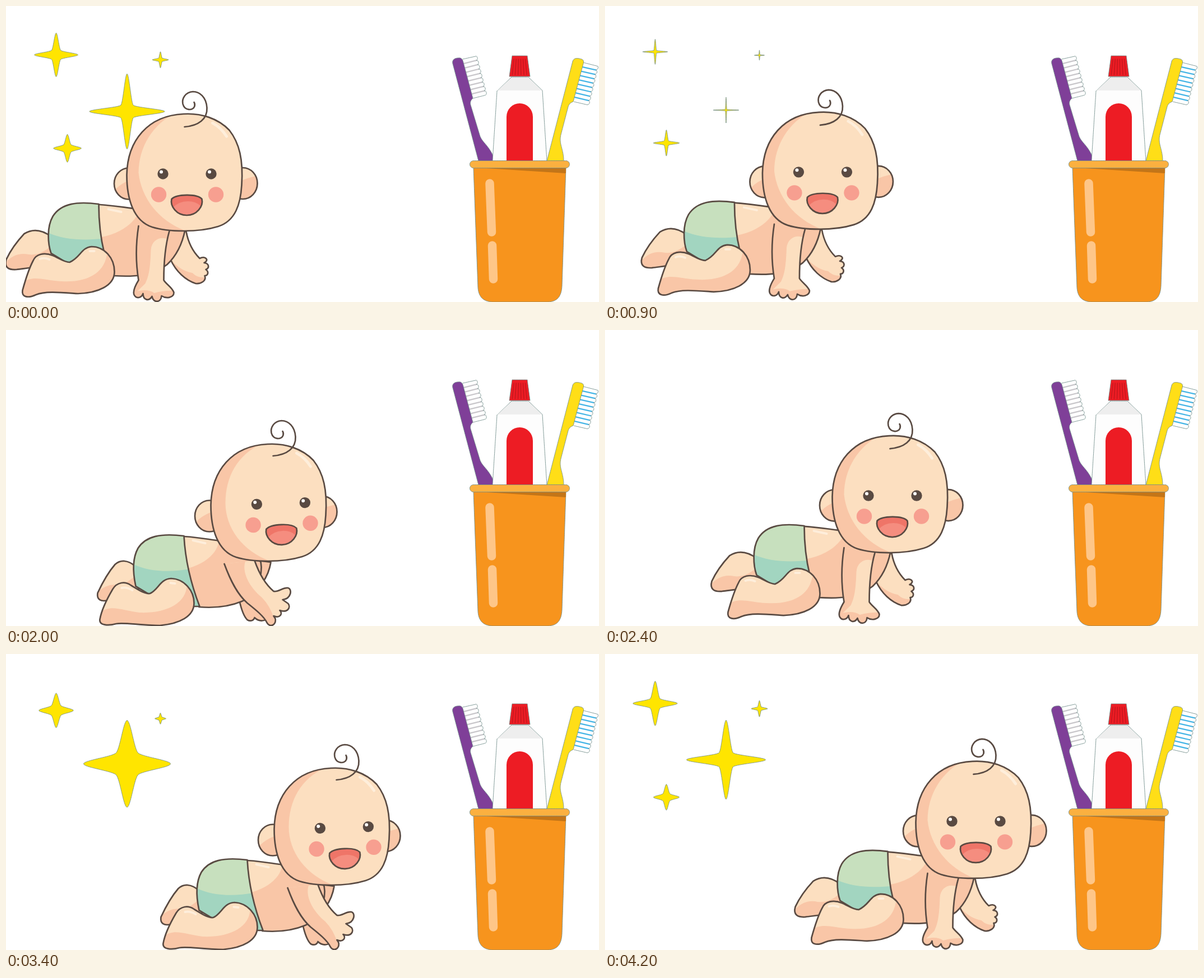
Animation of 1058x529 px, one loop 4.3 s. Source, as an HTML page with a canvas:

```html
<!DOCTYPE html>
<html lang="en">
<head>
<meta charset="utf-8">
<title>Crawling baby</title>
<style>
html, body { margin: 0; width: 100%; height: 100%; overflow: hidden; background: #fff; }
canvas { display: block; }
</style>
</head>
<body>
<canvas id="stage" width="1058" height="529"></canvas>
<script>
const ctx = document.getElementById('stage').getContext('2d');
const STEP = 100, STEPS = 43;
const INK = '#594a42', SKIN = '#fcdfc0', SHADE = '#f9c6a7', GLOSS = '#feeedb';
const MINT = '#c7e0be', TEAL = '#a2d5c0', EDGE = '#6f8c88';

function fill(d, color) {
  ctx.fillStyle = color;
  ctx.fill(new Path2D(d));
}

function line(d, color = INK, width = 2.7) {
  ctx.strokeStyle = color;
  ctx.lineWidth = width;
  ctx.stroke(new Path2D(d));
}

function dashed(path) {
  ctx.save();
  ctx.setLineDash([2, 1]);
  ctx.strokeStyle = EDGE;
  ctx.lineWidth = 0.9;
  ctx.stroke(path);
  ctx.restore();
}

function edged(d, color) {
  fill(d, color);
  dashed(new Path2D(d));
}

// Outlined shape with patches of colour clipped to it.
function part(d, base, ...patches) {
  ctx.save();
  ctx.clip(new Path2D(d));
  fill(d, base);
  for (const [shape, color] of patches) fill(shape, color);
  ctx.restore();
  line(d);
}

function dot(x, y, r, color) {
  ctx.fillStyle = color;
  ctx.beginPath();
  ctx.arc(x, y, r, 0, 7);
  ctx.fill();
}

// Each sparkle swells while rising, then thins out and vanishes.
const sparkles = [
  { x: 89.5, top: 81, rise: 32, peak: 40, birth: 29, life: 31 },
  { x: 275.5, top: 86.5, rise: 42, peak: 14.5, birth: 30, life: 31 },
  { x: 216, top: 186, rise: 26, peak: 80, birth: 25, life: 31 },
  { x: 109.5, top: 242.5, rise: 24, peak: 27.5, birth: 37, life: 26 }
];

function sparkle({ x, top, rise, peak, birth, life }, t) {
  const u = ((t - birth + STEPS) % STEPS) / life;
  if (u <= 0 || u >= 1) return;
  const size = peak * Math.sin(Math.PI * u ** 0.7);
  const waist = size * 0.3 * (1 - u ** 1.5);
  const bend = waist * 0.36, tip = waist * 0.32;
  const path = new Path2D();
  ctx.save();
  ctx.translate(x, top + rise * (1 - u) ** 2.7);
  path.moveTo(0, -size);
  for (let q = 0; q < 4; q++) {
    const c = [1, 0, -1, 0][q], s = [0, 1, 0, -1][q];
    const at = (a, b) => [a * c - b * s, a * s + b * c];
    path.bezierCurveTo(...at(tip, -size), ...at(waist - bend, -waist - bend), ...at(waist, -waist));
    path.bezierCurveTo(...at(waist + bend, bend - waist), ...at(size, -tip), ...at(size, 0));
  }
  ctx.fillStyle = '#ffe500';
  ctx.fill(path);
  dashed(path);
  ctx.restore();
}

// Tufts along a root line from (x, y) by (dx, dy), each of length (lx, ly).
function bristles(x, y, dx, dy, lx, ly, color) {
  const n = 9, path = new Path2D();
  const at = (k, l) => [x + dx * k / n + lx * l, y + dy * k / n + ly * l];
  path.moveTo(x, y);
  for (let i = 0; i < n; i++) {
    path.lineTo(...at(i + 0.08, 1));
    path.quadraticCurveTo(...at(i + 0.5, 1.09), ...at(i + 0.85, 1));
    path.lineTo(...at(i + 1, 0.93));
  }
  path.lineTo(...at(n, 0));
  ctx.fillStyle = '#fff';
  ctx.fill(path);
  for (let i = 1; i < n; i++) line(`M${at(i, 0)}L${at(i, 0.93)}`, color, 2.3);
  dashed(path);
}

function toiletries() {
  bristles(815, 95, 18, 70, 24, -6, '#c9c7cb');
  edged('M797 103C795 94 804 92 811 93Q815 95 816 101L833 165Q827 170 829 177L845 230C849 245 862 247 873 277H843Z', '#7f3f98');
  bristles(1030, 101, -17, 70, 26, 6, '#45b5e6');
  edged('M1011 99C1013 92 1020 93 1027 95Q1032 97 1030 103L1012 171Q1005 173 1003 180L990 230C986 247 995 255 995 277H965Z', '#ffde17');

  edged('M902 127H932L957 151L965 277H868L876 152Z', '#fdfdfd');
  fill('M902 128H932L956 151H877Z', '#eeeeee');
  fill('M893 277V198A23.5 24 0 0 1 940 198V277Z', '#ed1c24');
  edged('M903 89H930L935 126H898Z', '#ed1c24');
  for (let i = 1; i < 7; i++) line(`M${902 + i * 4.1} 95L${898 + i * 5.2} 123`, '#c4171e', 1.5);

  edged('M834 288H999L992 500C991 520 983 529 965 529H870C852 529 843 520 842 503Z', '#f7941d');
  fill('M842 289H999V299Z', '#c37518');
  edged('M834 276.5H999A6.5 6.5 0 0 1 999 289.5H834A6.5 6.5 0 0 1 834 276.5Z', '#fbb040');
  line('M863 317L866.5 404M867.5 428L869.5 488', '#fec688', 15.5);
}

function ear(x, y) {
  part(`M${x - 26} ${y}a26 28 0 1 1 52 0a26 28 0 1 1 -52 0Z`, SKIN,
    [`M${x - 28} ${y + 16}Q${x - 14} ${y - 6} ${x + 28} ${y - 14}V${y + 30}H${x - 26}Z`, SHADE]);
}

function face() {
  for (const side of [-1, 1]) {
    dot(324.5 + side * 43, 300, 9.7, INK);
    dot(321.5 + side * 43, 296.5, 3, '#fff');
    dot(325 + side * 51, 337, 13.7, '#f79f90');
  }
  part('M297 345C306 336 342 335 351 345C354 358 342 374 324 374C306 374 294 358 297 345Z', '#ef7568',
    ['M299 361Q309 349 326 349Q340 349 348 357L339 378H307Z', '#f58d7f']);
}

// turn: 0 looks ahead, 1 is tilted toward the crawl.
function head(turn) {
  ear(220.5 - 6 * turn, 317.5 + 4 * turn);
  ear(424 - 8 * turn, 317 - 3 * turn);
  part('M318 193C255 196 218 240 217 302C217 345 229 384 262 395C290 404 345 405 380 394C411 384 420 354 422 320C425 275 418 245 400 222C380 201 350 191 318 193Z', SHADE,
    [`M${307 + 7 * turn} 190C266 208 ${238 + 5 * turn} 250 ${238 + 5 * turn} 298C243 345 276 387 328 404H440V190Z`, SKIN]);
  line('M370 209Q385 217 395 233', GLOSS, 5);

  ctx.save();
  ctx.translate(8 * turn, -2 * turn);
  line('M320 216C345 214 361 202 360 182C359 163 347 153 335 153C321 154 315 166 317 175C320 187 335 188 338 179Q339 175 337 172');
  ctx.restore();

  ctx.save();
  ctx.translate(323 + 18 * turn, 320 - turn);
  ctx.rotate(-0.032 * turn);
  ctx.translate(-323, -320);
  face();
  ctx.restore();
}

function upright() {
  part('M82 412C66 400 50 397 34 407C20 422 8 440 2 453C-2 467 6 472 20 471C40 468 60 468 95 455Z', SKIN,
    ['M-5 466Q14 438 42 444Q62 447 84 427V480H-5Z', SHADE]);
  part('M323 403C327 425 337 441 347 451C357 446 365 454 355 459C364 460 365 468 358 471C364 475 362 482 356 482C360 491 349 497 340 496C322 490 305 475 295 453L300 403Z', SKIN,
    ['M290 448Q312 474 334 477Q345 488 360 484V500H290Z', SHADE]);
  part('M150 354C190 355 215 361 240 363L321 400C316 425 306 446 289 462C262 484 225 484 193 482L150 440Z', SHADE,
    ['M150 350H243C242 380 210 412 150 416Z', SKIN]);
  line('M184 363L207 368', GLOSS, 4);
  part('M167 354C130 349 100 352 85 376C74 395 76 425 82 442L115 462L177 442C169 410 167 380 167 354Z', MINT,
    ['M70 402C100 418 140 420 180 415V470H70Z', TEAL]);

  const arm = 'M238 393C233 425 233 460 238 490C230 503 228 511 230 516C234 524 243 522 246 514C246 525 256 529 262 519C264 531 278 531 279 518C288 524 301 521 301 512C298 503 288 498 283 490C283 460 285 430 293 402';
  fill(arm, SKIN);
  ctx.save();
  ctx.clip(new Path2D(arm));
  fill('M230 390H295V420C283 410 262 414 260 436C259 465 257 482 250 496L225 520Z', SHADE);
  fill('M225 513Q252 503 266 513Q285 508 303 509V535H225Z', SHADE);
  ctx.restore();
  line(arm);

  part('M115 458C135 449 135 432 154 430C177 430 195 450 195 475C195 500 165 513 130 514C100 512 72 509 55 516C40 523 29 520 31 508C36 490 42 470 50 455C55 443 70 440 85 446C95 450 105 458 115 458Z', SKIN,
    ['M25 501C44 478 64 490 100 492C148 495 179 476 182 440L205 450V525H25Z', SHADE]);
  line('M62 452Q70 449 79 453M151 438L159 438', GLOSS, 4);
  head(0);
}

function reaching() {
  part('M106 422C93 411 80 410 70 419C57 434 46 455 39 470C37 482 45 486 57 483L112 465Z', SKIN,
    ['M30 478Q52 451 76 456Q94 452 108 437V490H30Z', SHADE]);
  part('M325 412L348 415C346 428 340 442 333 452L318 440Z', SHADE);
  part('M292 484C296 502 300 512 306 518C313 522 318 518 319 514C327 522 339 521 343 513L320 478Z', SHADE);
  part('M175 368C212 369 235 374 252 376L330 414C335 440 320 475 296 485C270 496 245 497 220 495L175 430Z', SHADE,
    ['M175 365H254C262 390 235 424 175 431Z', SKIN]);
  line('M209 376L231 381', GLOSS, 4);
  part('M193 368C152 363 125 368 111 390C100 410 102 435 107 458L135 475L210 494H221C204 450 195 405 193 368Z', MINT,
    ['M96 415C125 432 165 434 204 427L230 500H96Z', TEAL]);

  const arm = 'M265 418C276 448 288 472 306 488C321 500 336 512 341 523C346 532 358 528 356 516L353 511C364 516 370 507 364 501C378 506 384 496 379 489L369 482C385 480 386 463 379 461C370 459 362 469 353 467C339 455 328 438 319 412';
  fill(arm, SKIN);
  ctx.save();
  ctx.clip(new Path2D(arm));
  fill('M260 410H304C294 430 309 459 332 478Q346 492 354 516L360 535H260Z', SHADE);
  ctx.restore();
  line(arm);

  part('M132 471C147 465 150 445 170 444C194 445 211 466 211 488C211 512 185 525 150 528C115 528 85 522 72 525C58 529 41 528 43 517C46 500 56 480 66 463C74 450 88 449 98 456C110 463 122 472 132 471Z', SKIN,
    ['M36 511C60 487 78 501 114 505C162 507 199 488 198 454L220 465V535H36Z', SHADE]);
  line('M82 461Q91 459 101 465M169 452L177 453', GLOSS, 4);
  ctx.translate(24, 11);
  head(1);
}

// Left edge of the body at a few times along the crawl.
const crawl = [[0, 76], [4, 102], [13, 173], [20, 228], [28, 304], [34, 341], [42, 415]];

function crawlAt(t) {
  const i = Math.max(1, crawl.findIndex(([time]) => time >= t));
  const [t0, x0] = crawl[i - 1], [t1, x1] = crawl[i];
  return x0 + (x1 - x0) * (t - t0) / (t1 - t0);
}

function baby(t) {
  const x = crawlAt(t), phase = t % 15;
  ctx.save();
  if (phase >= 2 && phase < 9) {
    ctx.translate(x - 103.5, 0);
    reaching();
  } else {
    ctx.translate(x - 77.5, -4 * Math.sqrt(Math.sin(Math.PI * t / STEPS)));
    upright();
  }
  ctx.restore();
}

function draw(now) {
  const t = Math.floor(now / STEP) % STEPS;
  ctx.fillStyle = '#fff';
  ctx.fillRect(0, 0, 1058, 529);
  ctx.lineCap = ctx.lineJoin = 'round';
  for (const s of sparkles) sparkle(s, t);
  toiletries();
  baby(t);
}

let start;
function loop(now) {
  start ??= now;
  draw(now - start);
  requestAnimationFrame(loop);
}
draw(0);
requestAnimationFrame(loop);
</script>
</body>
</html>
```
